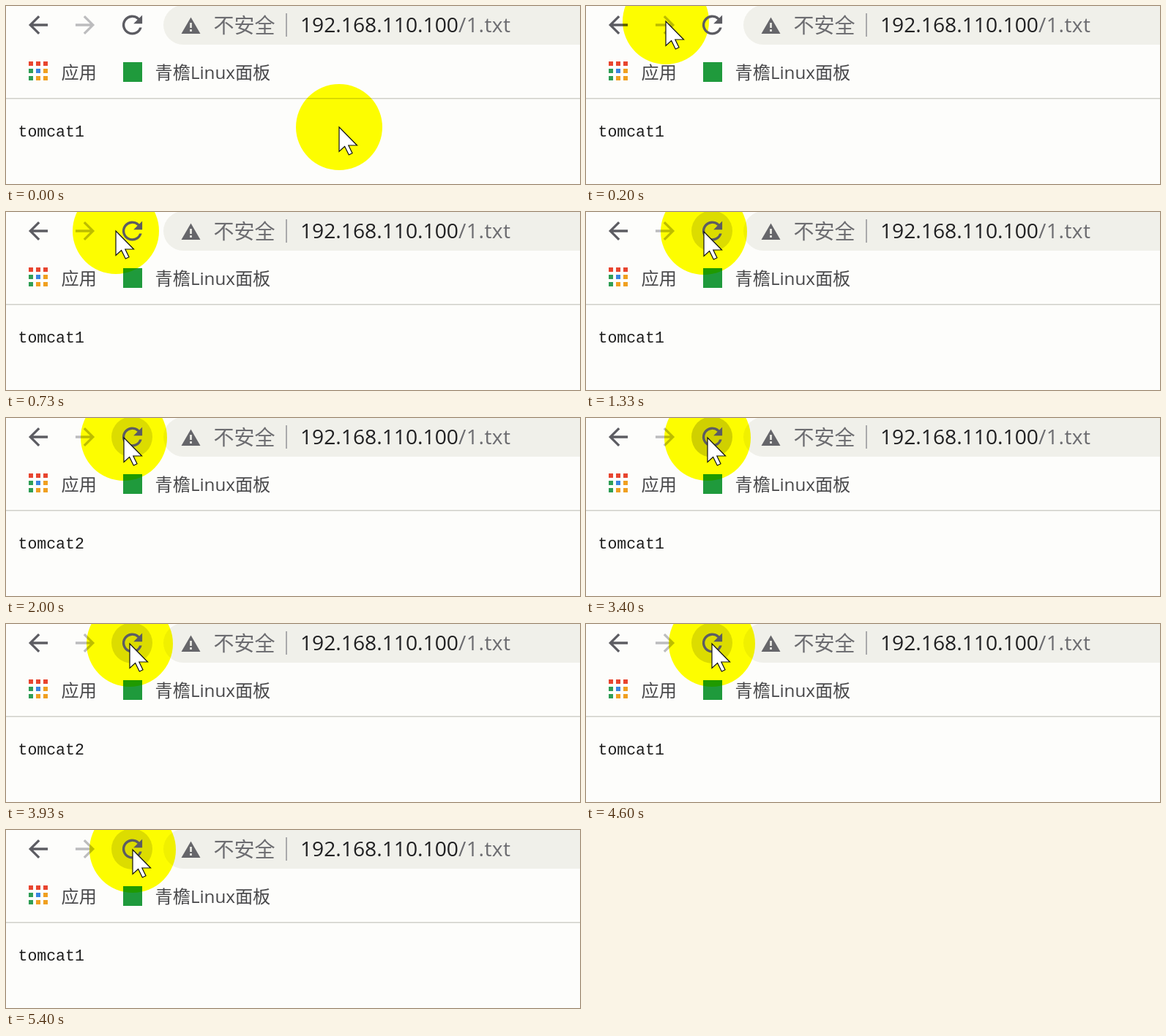
Write an HTML page that moves like this. It is 784 px wide and 244 px high and loops after 5.86 s.

```html
<!DOCTYPE html>
<html lang="zh-CN">
<head>
<meta charset="utf-8">
<title>Reload</title>
<style>
  html, body { margin: 0; width: 100%; height: 100%; overflow: hidden; background: #fdfdfb; }
  svg { display: block; width: 784px; height: 244px; }
  text { font-family: 'Open Sans', 'Noto Sans CJK SC', 'Noto Sans CJK', sans-serif; }
  .label { font-size: 24.2px; fill: #48484a; }
  .url { font-size: 28.2px; fill: #202022; }
  .path { letter-spacing: .5px; }
  .page { font-family: 'Liberation Mono', monospace; font-size: 21.5px; fill: #1c1c1c; }
  .muted { fill: #6c6c70; }
  .icon { fill: #5c5c62; }
  #halo { fill: #ff0; mix-blend-mode: multiply; }
</style>
</head>
<body>
<svg viewBox="0 0 784 244">
  <defs>
    <path id="arrow" transform="scale(1.63) translate(-12 -12)"
      d="M20 11H7.83l5.59-5.59L12 4l-8 8 8 8 1.41-1.41L7.83 13H20z"/>
  </defs>
  <rect width="784" height="244" fill="#fdfdfb"/>

  <!-- toolbar -->
  <rect x="215" y="-1" width="700" height="54" rx="27" fill="#f0f0ea"/>
  <circle id="hover" cx="172" cy="26" r="28" opacity="0"/>
  <use href="#arrow" class="icon" transform="translate(44 26)"/>
  <use href="#arrow" fill="#bcbcbe" transform="translate(108 26) scale(-1 1)"/>
  <path fill="#66666a" fill-rule="evenodd" d="M252.500 15.500L265.500 38H239.500zM251.200 23v7h2.600v-7zM251.200 32v3h2.600v-3z"/>
  <text class="muted" x="283.500" y="37" font-size="28">不安全</text>
  <rect x="382" y="10" width="2" height="32" fill="#aaaaac"/>
  <text class="url" x="402" y="36">192.168.110.100<tspan class="muted path">/1.txt</tspan></text>

  <!-- bookmarks -->
  <g id="apps"></g>
  <text class="label" x="75.500" y="100">应用</text>
  <rect x="160" y="77" width="26" height="27" fill="#1f9a3c"/>
  <text class="label" x="203.500" y="100">青檐Linux面板</text>
  <rect y="126" width="784" height="1.500" fill="#d0d0ca"/>

  <text class="page" x="16.500" y="178.500">tomcat<tspan id="node">1</tspan></text>

  <circle id="halo" r="59"/>
  <path class="icon" transform="translate(172.500 26) scale(1.7) translate(-12 -12)"
    d="M17.65 6.35A8 8 0 1 0 19.73 14h-2.08A6 6 0 1 1 16.22 7.78L13 11h7V4z"/>
  <path id="pointer" d="M0 0V33.500L7.600 26.500L13.300 38L18 35.800L12.800 25H24.500Z"
    fill="#fff" stroke="#111" stroke-width="1.200"/>
</svg>
<script>
  const LOOP = 5860;
  const REPLIES = [1930, 3130, 3730, 4330];
  const PAGE = [455, 166], FORWARD = [109, 21], RELOAD = [161, 27], REST = [173, 26.5];

  const $ = id => document.getElementById(id);
  const progress = (t, from, to) => Math.min(1, Math.max(0, (t - from) / (to - from)));
  const smooth = p => p * p * (3 - 2 * p);
  const easeOut = p => 1 - (1 - p) ** 2;
  const mix = (a, b, p) => a.map((v, i) => Math.round(v + (b[i] - v) * p));

  // The screen refreshes at alternating 130 and 70 ms intervals.
  const refresh = t => t - t % 200 + (t % 200 < 130 ? 0 : 130);

  function position(t) {
    if (t < 130) return PAGE;
    if (t < 960) return mix(FORWARD, RELOAD, smooth(progress(t, 200, 960)));
    return mix(RELOAD, REST, easeOut(progress(t, 2930, 5130)));
  }

  function appColor(row, col) {
    if (row === 0) return '#e8452f';
    if (col === 0) return '#2f9e55';
    return row === 1 && col === 1 ? '#3a84e0' : '#f0a020';
  }

  for (let i = 0; i < 9; i++) {
    const row = Math.floor(i / 3), col = i % 3;
    $('apps').innerHTML +=
      `<rect x="${31 + col * 10}" y="${76 + row * 10}" width="6" height="6" fill="${appColor(row, col)}"/>`;
  }

  function draw() {
    const t = refresh(performance.now() % LOOP);
    const place = `translate(${position(t)})`;
    $('halo').setAttribute('transform', place);
    $('pointer').setAttribute('transform', place);

    const pressed = REPLIES.some(r => t < r && t >= r - 330);
    $('hover').setAttribute('opacity', .13 * progress(t, 730, 930) + (pressed ? .05 : 0));
    $('node').textContent = 1 + REPLIES.filter(r => r <= t).length % 2;
    requestAnimationFrame(draw);
  }
  draw();
</script>
</body>
</html>
```
